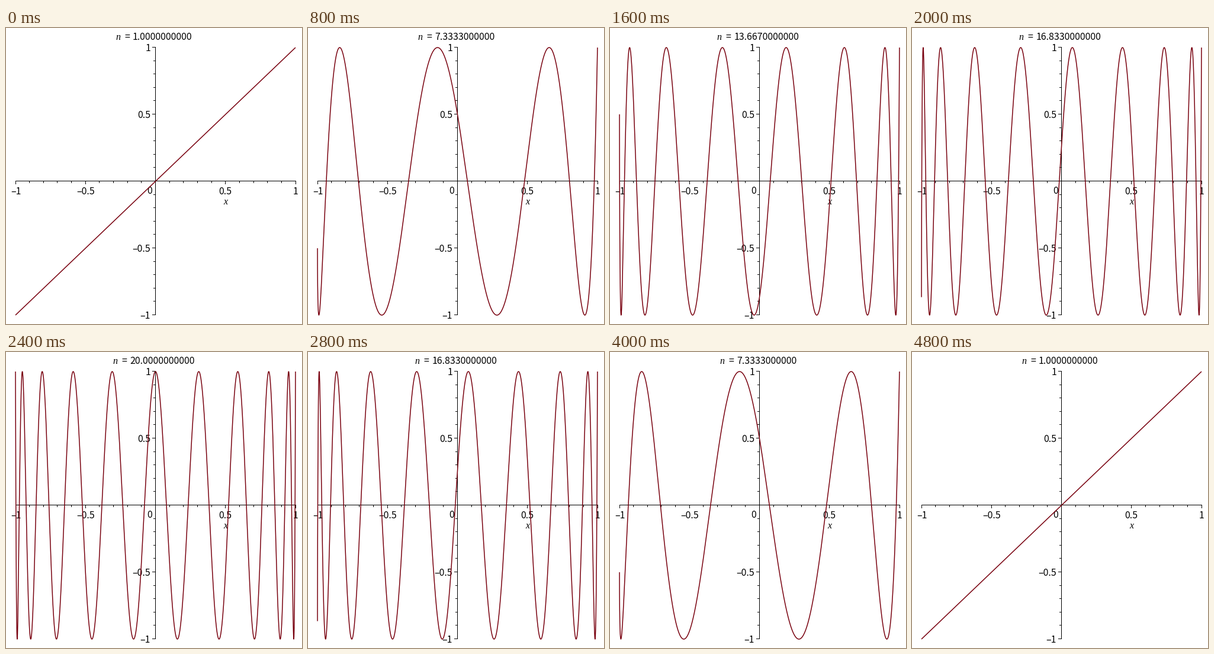
Write a matplotlib script that moves like this. It is 500x500 px and loops after 4900 ms.

```python
import numpy as np
import matplotlib.pyplot as plt
from matplotlib.animation import FuncAnimation

SIZE, DPI = 500, 100
PX = 72 / DPI                     # one pixel in points
STEPS = 24                        # steps from lowest to highest n
FRAMES = 2 * STEPS + 1
N_MIN, N_MAX = 1, 20
LEFT, RIGHT, TOP, BOTTOM = 16, 489, 33, 485
X0, Y0 = 252, 258                 # pixel column and row of the axes
RED = "#78000e"

fig = plt.figure(figsize=(SIZE / DPI, SIZE / DPI), dpi=DPI, facecolor="white")
ax = fig.add_axes([0, 0, 1, 1])
ax.set_xlim(0, SIZE)
ax.set_ylim(SIZE, 0)
ax.axis("off")


def to_px(x, y):
    """Map plot units to stage coordinates."""
    return ((LEFT + RIGHT) / 2 + x * (RIGHT - LEFT) / 2,
            (TOP + BOTTOM) / 2 - y * (BOTTOM - TOP) / 2)


def rule(xa, ya, xb, yb):
    """One-pixel line through whole pixels, both ends included."""
    ax.plot([xa + 0.5, xb + 0.5], [ya + 0.5, yb + 0.5], color="black", lw=PX,
            solid_capstyle="projecting", snap=False)


def label(x, y, text, ha="center"):
    return ax.text(x, y, text, ha=ha, va="baseline", color="black",
                   family="Noto Sans CJK JP", weight="light",
                   fontsize=16 * PX)


def variable(x, y, text, ha="center"):
    return ax.text(x, y, text, ha=ha, va="baseline", color="black",
                   family="Liberation Serif", style="italic",
                   fontsize=16 * PX)


def draw_axes():
    rule(LEFT, Y0, RIGHT, Y0)
    rule(X0, TOP - 1, X0, BOTTOM - 1)
    for k in range(-10, 11):
        if k == 0:
            continue
        size = 5 if k % 5 == 0 else 3
        px, py = to_px(k / 10, k / 10)
        col, row = int(px), int(py - 0.5)
        rule(col, Y0, col, Y0 + size)
        rule(X0 - size, row, X0, row)
        if k % 5 == 0:
            text = f"{k / 10:g}".replace("-", "\u2013")
            label(col + 0.5, 281, text)
            label(244, row + 7, text, "right")
    label(242.5, 280, "0")
    variable(370.5, 298, "x")


draw_axes()
theta = np.linspace(0, np.pi, 3001)
curve, = ax.plot([], [], color=RED, lw=1.5 * PX, zorder=5,
                 solid_joinstyle="round", solid_capstyle="butt")
name = variable(0, 20, "n", "left")
equals = label(0, 20, "=")
value = label(0, 20, "", "left")


def update(i):
    step = STEPS - abs(i - STEPS)
    n = float(f"{N_MIN + (N_MAX - N_MIN) * step / STEPS:.5g}")
    curve.set_data(*to_px(np.cos(theta), np.cos(n * theta)))

    digits = f"{n:.10f}"
    start = 251.5 - (131 + 9 * (len(digits) - 12)) / 2
    name.set_x(start - 1)
    equals.set_x(start + 18.5)
    value.set_x(start + 28)
    value.set_text(digits)
    return curve, name, equals, value


anim = FuncAnimation(fig, update, frames=FRAMES, interval=100,
                     repeat=True, repeat_delay=0, blit=False)
plt.show()
```
